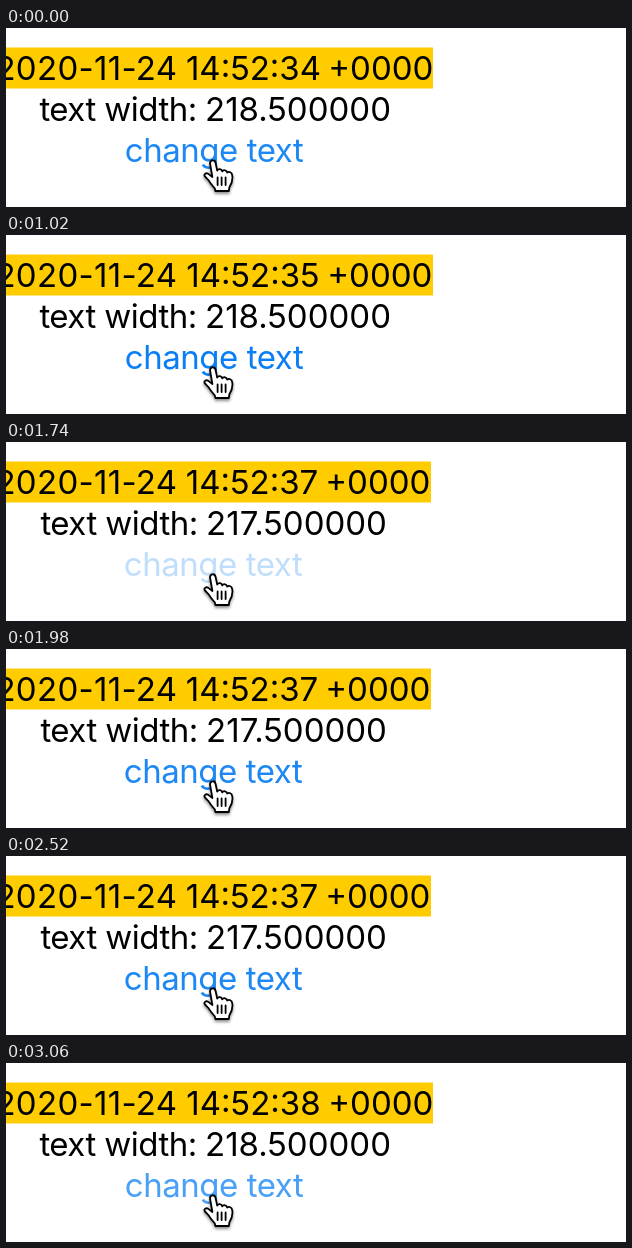
Write an HTML page that moves like this. It is 620x179 px and loops after 3.12 s.

```html
<!DOCTYPE html>
<html lang="en">
<head>
<meta charset="utf-8">
<title>Change text</title>
<style>
  html, body { margin: 0; width: 100%; height: 100%; overflow: hidden; background: #fff; }
  svg { display: block; width: 620px; height: 179px; }
  text {
    font: 400 33px Inter, "Liberation Sans", sans-serif;
    font-optical-sizing: none;
    text-anchor: middle;
  }
  .word { letter-spacing: -0.5px; }
  .date { text-anchor: end; letter-spacing: 0.3px; }
  #button { fill: #0a7ef4; }
  #hand { filter: drop-shadow(0 2px 1.4px rgba(0, 0, 0, .45)); }
</style>
</head>
<body>
<svg viewBox="0 0 620 179">
  <rect id="band" x="-10" y="19.5" width="437" height="41" fill="#ffcc00"/>
  <text class="date" x="171.3" y="52">2020-11-24</text>
  <text id="clock" y="52"></text>
  <text id="zone" y="52">+0000</text>
  <g id="label">
    <text class="word" x="61.6" y="93">text</text>
    <text class="word" x="144.5" y="93">width:</text>
  </g>
  <text id="width" y="93"></text>
  <g id="button">
    <text class="word" x="175.3" y="134">change</text>
    <text class="word" x="269" y="134">text</text>
  </g>
  <g id="hand" stroke="#000" stroke-width="1.8" stroke-linecap="round" stroke-linejoin="round">
    <path fill="#fff" d="M204.2 136.5C203.2 131.6 208.6 130.8 209.6 135L211.2 142.6
      C212.4 140.4 215.8 140.8 216.2 143.4C217.6 141.4 220.6 142 221.2 144.6
      C223 143.2 225.8 144.2 226.2 147C227 151.6 226 155.4 223.4 159.2L222.8 163H209.4L208.8 160.4
      C206.4 157.6 204.4 155.4 202.8 152.6C201.4 150.6 199.6 149.6 198.6 148
      C197.8 146 200 144.6 202 145.6L206.4 149Z"/>
    <path fill="none" d="M211.6 149.5V157M215.6 149.5V157M219.6 149.5V157"/>
  </g>
</svg>
<script>
const LOOP = 3120, STEP = 60, FADE = 300, DIM = 0.25;

// click time, seconds shown, text width in points
const clicks = [
  [-240, 34, 218.5],
  [420, 35, 218.5],
  [1080, 36, 218.5],
  [1740, 37, 217.5],
  [2280, 37, 217.5],
  [2880, 38, 218.5]
];

const $ = id => document.getElementById(id);
const smooth = p => p * p * (3 - 2 * p);

function setText(id, value, x) {
  const el = $(id);
  if (el.textContent !== value) el.textContent = value;
  el.setAttribute("x", x);
}

function draw(time) {
  const t = Math.floor((time % LOOP) / STEP) * STEP;
  const [start, sec, points] = clicks.filter(c => c[0] <= t).pop();
  const shift = points - 218.5;
  const tail = { 34: 0, 35: -1, 36: -0.5, 37: -3, 38: 0 }[sec];

  $("band").setAttribute("width", points * 2);
  setText("clock", "14:52:" + sec, 247.5 + tail / 2);
  setText("zone", "+0000", 374.8 + tail);
  setText("width", points.toFixed(6), 292 + shift * 1.5);
  $("label").setAttribute("transform", `translate(${-shift} 0)`);

  const button = $("button");
  button.setAttribute("transform", `translate(${shift} 0)`);
  button.setAttribute("opacity", DIM + (1 - DIM) * smooth(Math.min(1, (t - start) / FADE)));
}

const origin = performance.now();
function tick(now) {
  draw(Math.max(0, now - origin));
  requestAnimationFrame(tick);
}
draw(0);
requestAnimationFrame(tick);
</script>
</body>
</html>
```
